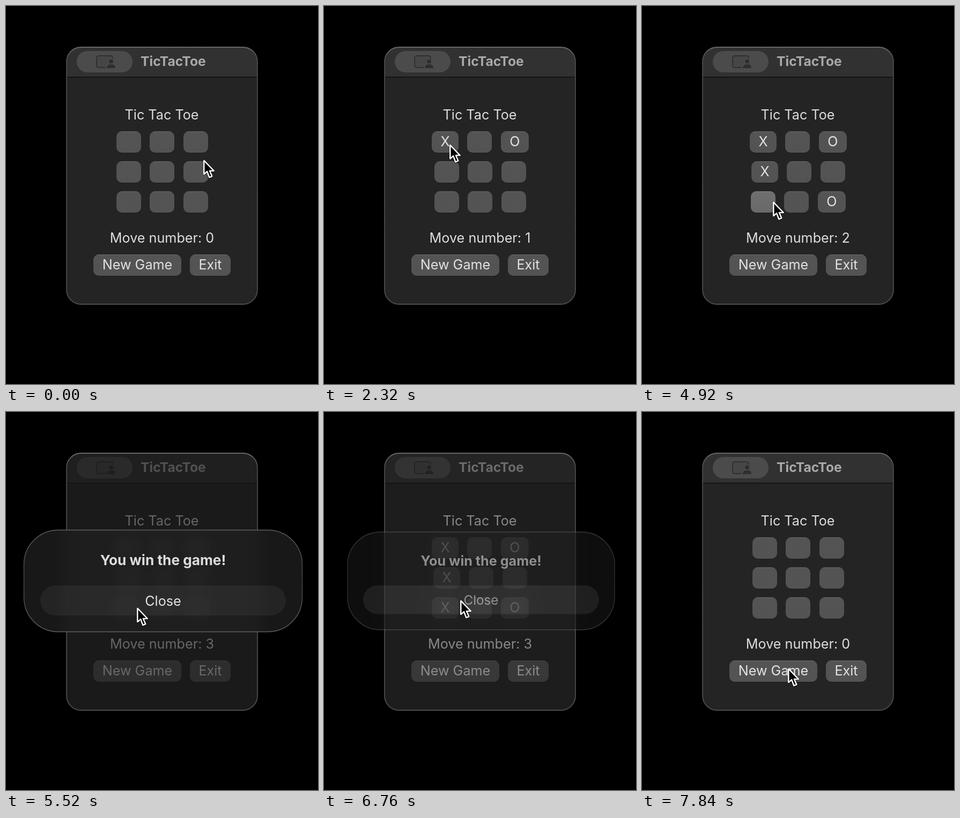
An HTML page with a canvas that plays this animation: 582x706 px, repeating every 8 s.

```html
<!DOCTYPE html>
<html lang="en">
<head>
<meta charset="utf-8">
<title>Tic Tac Toe</title>
<style>
  html, body { margin: 0; width: 100%; height: 100%; overflow: hidden; background: #000; }
  canvas { display: block; }
</style>
</head>
<body>
<canvas id="stage" width="582" height="706"></canvas>
<script>
const W = 582, H = 706, LOOP = 8000;
const stage = document.getElementById('stage');
const screen = stage.getContext('2d');
const layerCanvas = Object.assign(document.createElement('canvas'), { width: W, height: H });
const layer = layerCanvas.getContext('2d');

const FONT = 'Inter, "Open Sans", sans-serif';
const TEXT = '#dedede';
const OPEN = 5250, DISMISS = 6680;
const ALERT = { cx: 293, cy: 315.5, w: 519, h: 190 };

// Board rows, move count and start time
const boards = [
  [0, ['   ', '   ', '   '], 0],
  [1720, ['X O', '   ', '   '], 1],
  [3720, ['X O', 'X  ', '  O'], 2],
  [5280, ['X O', 'X  ', 'X O'], 3],
  [7680, ['   ', '   ', '   '], 0],
];

// Button presses: name, from, to
const presses = [
  ['00', 1600, 1720],
  ['10', 3560, 3720],
  ['20', 4920, 5280],
  ['close', 6480, 7400],
  ['new', 7520, 7680],
];

// Pointer stops: time, x, y
const pointerPath = [
  [0, 368, 287], [260, 368, 287], [1160, 234, 258], [2300, 234, 258],
  [3140, 242, 314], [3320, 242, 314], [3360, 240, 313], [4180, 240, 313],
  [4460, 267, 398], [4760, 244, 365], [5740, 244, 365], [5880, 238, 276],
  [6040, 254, 351], [6790, 254, 351], [7440, 272, 478], [LOOP, 272, 478],
];

const ease = p => p * p * (3 - 2 * p);

// Critically damped spring falling from 1 to 0
const settle = (ms, rate) => ms <= 0 ? 1 : (1 + ms * rate) * Math.exp(-ms * rate);

const isPressed = (name, t) => presses.some(([n, a, b]) => n === name && t >= a && t < b);

function box(c, x, y, w, h, r) {
  c.beginPath();
  c.roundRect(x, y, w, h, r);
}

function text(c, str, x, baseline, { size = 25.2, weight = 400, color = TEXT, align = 'center' } = {}) {
  c.font = `${weight} ${size}px ${FONT}`;
  c.textAlign = align;
  c.fillStyle = color;
  c.fillText(str, x, baseline);
}

function button(c, x, y, w, label, pressed) {
  box(c, x, y + 1, w, 40, 10);
  c.fillStyle = '#1b1b1b';
  c.fill();
  const shade = c.createLinearGradient(0, y, 0, y + 40);
  shade.addColorStop(0, pressed ? '#808080' : '#696969');
  shade.addColorStop(0.05, pressed ? '#6f6f6f' : '#545454');
  shade.addColorStop(1, pressed ? '#696969' : '#535353');
  box(c, x, y, w, 40, 10);
  c.fillStyle = shade;
  c.fill();
  text(c, label, x + w / 2, y + 28, { color: '#e2e2e2' });
}

function drawIcon(c) {
  box(c, 132, 84, 104, 40, 20);
  c.fillStyle = '#4b4b4b';
  c.fill();
  box(c, 169, 93, 30, 22, 4);
  c.fillStyle = '#464646';
  c.fill();
  c.strokeStyle = '#303030';
  c.lineWidth = 2;
  c.stroke();
  // Person in front of the display, with a gap around it
  for (const [grow, color] of [[2, '#4b4b4b'], [0, '#2e2e2e']]) {
    c.fillStyle = color;
    c.beginPath();
    c.arc(196, 103.5, 4 + grow, 0, 7);
    c.fill();
    box(c, 188 - grow, 109 - grow, 16 + 2 * grow, 7 + grow, [7, 7, 1, 1]);
    c.fill();
  }
}

function drawBoard(c, rows, t) {
  const widths = { ' ': 46, X: 50, O: 52 }, gap = 16.6;
  rows.forEach((row, r) => {
    const total = [...row].reduce((sum, mark) => sum + widths[mark], 2 * gap);
    let x = 291.3 - total / 2;
    [...row].forEach((mark, col) => {
      button(c, Math.round(x), 234 + 56 * r, widths[mark], mark, isPressed(`${r}${col}`, t));
      x += widths[mark] + gap;
    });
  });
}

function drawWindow(c, t, dim) {
  const [, rows, moves] = boards.findLast(([start]) => t >= start);
  c.save();
  box(c, 113, 77, 356, 480, 27);
  c.clip();
  c.fillStyle = '#242424';
  c.fillRect(113, 77, 356, 480);
  c.fillStyle = '#313131';
  c.fillRect(113, 77, 356, 55);
  c.fillStyle = '#0c0c0c';
  c.fillRect(113, 132, 356, 1.3);
  drawIcon(c);
  text(c, 'TicTacToe', 251, 112, { size: 24.7, weight: 700, color: '#a9a9a9', align: 'left' });
  text(c, 'Tic Tac Toe', 290.5, 212);
  drawBoard(c, rows, t);
  text(c, `Move number: ${moves}`, 291, 442);
  button(c, 163, 464, 164, 'New Game', isPressed('new', t));
  button(c, 343, 464, 76, 'Exit', false);
  c.fillStyle = `rgba(20,20,20,${0.59 * dim})`;
  c.fillRect(113, 77, 356, 480);
  c.restore();

  const rim = c.createLinearGradient(0, 76, 0, 558);
  rim.addColorStop(0, '#686868');
  rim.addColorStop(0.06, '#4a4a4a');
  rim.addColorStop(1, '#4c4c4c');
  box(c, 113, 77, 356, 480, 27);
  c.strokeStyle = rim;
  c.lineWidth = 1.8;
  c.stroke();
}

function drawAlert(t, opacity, scale) {
  const { cx, cy, w, h } = ALERT;
  layer.clearRect(0, 0, W, H);
  layer.save();
  const place = () => {
    layer.translate(cx, cy);
    layer.scale(scale, scale);
    layer.translate(-cx, -cy);
  };
  place();
  box(layer, cx - w / 2, cy - h / 2, w, h, 64);
  layer.clip();
  // Frosted glass: blurred view of what lies behind
  layer.resetTransform();
  layer.filter = 'blur(14px)';
  layer.drawImage(stage, 0, 0);
  layer.filter = 'none';
  layer.fillStyle = 'rgba(32,32,32,.78)';
  layer.fillRect(0, 0, W, H);
  layer.restore();

  layer.save();
  place();
  const rim = layer.createLinearGradient(0, cy - h / 2, 0, cy + h / 2);
  rim.addColorStop(0, '#606060');
  rim.addColorStop(0.5, '#444');
  rim.addColorStop(1, '#606060');
  box(layer, cx - w / 2, cy - h / 2, w, h, 64);
  layer.strokeStyle = rim;
  layer.lineWidth = 1.5;
  layer.stroke();
  box(layer, 64, 324, 458, 56, 28);
  layer.fillStyle = `rgba(255,255,255,${isPressed('close', t) ? 0.12 : 0.05})`;
  layer.fill();
  text(layer, 'You win the game!', cx, 286, { size: 26.2, weight: 700 });
  text(layer, 'Close', cx, 362, { color: '#e4e4e4' });
  layer.restore();

  screen.globalAlpha = opacity;
  screen.drawImage(layerCanvas, 0, 0);
  screen.globalAlpha = 1;
}

function drawPointer(c, t) {
  const i = pointerPath.findIndex(([time]) => time > t);
  const [t0, x0, y0] = pointerPath[i - 1], [t1, x1, y1] = pointerPath[i];
  const p = ease((t - t0) / (t1 - t0));
  c.save();
  c.translate(x0 + (x1 - x0) * p, y0 + (y1 - y0) * p);
  c.lineJoin = 'round';
  c.lineWidth = 2.2;
  c.strokeStyle = '#fff';
  c.fillStyle = '#000';
  const arrow = new Path2D('M1.4 1.8V27L7.2 21.8 11.4 33 16.2 31 11.8 20.8H19.6Z');
  c.shadowColor = 'rgba(0,0,0,.4)';
  c.shadowBlur = 3;
  c.shadowOffsetY = 1;
  c.stroke(arrow);
  c.shadowColor = 'transparent';
  c.fill(arrow);
  c.stroke(arrow);
  c.restore();
}

function draw(t) {
  let opacity = 0, dim = 0, scale = 1;
  if (t >= DISMISS) {
    opacity = settle(t - DISMISS, 0.0175);
    dim = settle(t - DISMISS, 0.013);
    scale = 0.905 + 0.095 * opacity;
  } else if (t >= OPEN) {
    opacity = dim = 1 - settle(t - OPEN, 0.028);
    scale = 1.025 - 0.025 * opacity;
  }
  screen.fillStyle = '#000';
  screen.fillRect(0, 0, W, H);
  drawWindow(screen, t, dim);
  if (opacity > 0.005) drawAlert(t, opacity, scale);
  drawPointer(screen, t);
}

const start = performance.now();
function tick() {
  draw((performance.now() - start) % LOOP);
  requestAnimationFrame(tick);
}
tick();
</script>
</body>
</html>
```
